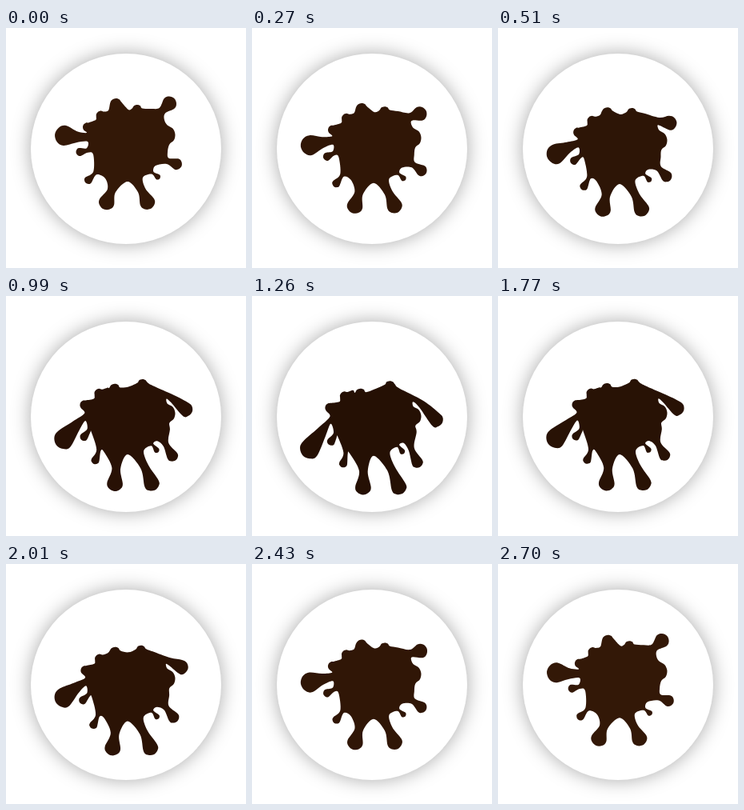
These frames come from a looping animation (300 by 300 pixels, 2730 ms). An HTML page:

```html
<!DOCTYPE html>
<html lang="en">
<head>
<meta charset="utf-8">
<title>Splash</title>
<style>
  html, body { margin: 0; width: 100%; height: 100%; overflow: hidden; background: #fff; }
  .disc {
    position: absolute; left: 31px; top: 32px; width: 238px; height: 238px;
    border-radius: 50%; background: #fff; box-shadow: 0 0 24px rgba(0, 0, 0, .34);
  }
  svg { position: absolute; left: 0; top: 0; }
</style>
</head>
<body>
<div class="disc"></div>
<svg width="300" height="300" viewBox="0 0 300 300"><path id="blob"/></svg>
<script>
const LOOP = 2730, STEP = 30;
const CENTER = [152, 150];
const BRIGHT = [51, 24, 7], DARK = [36, 15, 4];

// Each part: the valley before it, its round end, the radius, and how far the end sags.
const bump = (valley, end, r, fall) => ({ valley, end, r, fall, spread: 70 });
const drip = (valley, end, r, fall) => ({ valley, end, r, fall, spread: 90, neck: .55 });

// Clockwise from the top.
const parts = [
  bump([128, 103], [137.5, 95.5], 7.5, [-2, 30]),
  bump([153, 102], [164, 103], 7, [9, 11]),
  drip([182, 101], [204, 94.5], 9, [28, 65]),
  bump([198, 115], [198.5, 134], 13, [0, 18]),
  drip([202, 155], [213, 170], 7, [-7, 41]),
  drip([187, 172], [189.5, 186], 3.5, [-2, 9]),
  drip([171, 187], [176.5, 217.5], 9.5, [7.5, 23]),
  drip([152, 192], [126, 217.5], 9.8, [14, 23]),
  drip([124, 188], [103, 190], 5, [12, 21]),
  drip([109, 158], [92.5, 155], 5, [7, 29]),
  drip([102, 142], [73.5, 134.5], 12.5, [-1, 61]),
  bump([101, 131], [102, 124], 6, [-5, 17]),
  bump([112, 115], [119, 110], 6.5, [-3, 17]),
];

const mix = (a, b, k) => a.map((v, i) => v + (b[i] - v) * k);
const polar = ([x, y], r, a) => [x + r * Math.cos(a), y + r * Math.sin(a)];

// The body sinks most around its middle height and widens a little.
const sink = ([x, y], s) => [x + s * .08 * (x - CENTER[0]), y + s * (22 - .22 * Math.abs(y - 130))];

function partPoints(part, next, s) {
  const { r, spread, neck } = part;
  const from = sink(part.valley, s), to = sink(next.valley, s);
  const end = part.end.map((v, i) => v + s * part.fall[i]);
  const root = mix(mix(from, to, .5), CENTER, .2);
  const [dx, dy] = neck ? [end[0] - root[0], end[1] - root[1]] : [to[1] - from[1], from[0] - to[0]];
  const dir = Math.atan2(dy, dx);
  const pts = [-1, -.5, 0, .5, 1].map(k => polar(end, r, dir + k * spread * Math.PI / 180));
  if (neck) {
    const mid = mix(root, end, .6);
    mid[1] -= s * .25 * Math.hypot(dx, dy) * Math.cos(dir) ** 2; // hanging arms arch upwards
    pts.unshift(polar(mid, neck * r, dir - Math.PI / 2));
    pts.push(polar(mid, neck * r, dir + Math.PI / 2));
  }
  return [from, ...pts];
}

// Closed smooth curve through all points.
function curve(pts) {
  const n = pts.length, at = i => pts[(i + n) % n];
  const handle = (p, a, b) => p.map((v, k) => (v + (b[k] - a[k]) / 6).toFixed(2));
  let d = 'M' + pts[0];
  for (let i = 0; i < n; i++) {
    const p = at(i), q = at(i + 1);
    d += `C${handle(p, at(i - 1), q)} ${handle(q, at(i + 2), p)} ${q}`;
  }
  return d + 'Z';
}

const blob = document.getElementById('blob');

function draw(ms) {
  const t = Math.floor((ms % LOOP) / STEP) * STEP;
  const s = 1 - Math.abs(1 - 2 * t / LOOP);
  const pts = parts.flatMap((p, i) => partPoints(p, parts[(i + 1) % parts.length], s));
  blob.setAttribute('d', curve(pts));
  blob.setAttribute('fill', `rgb(${mix(BRIGHT, DARK, s).map(Math.round)})`);
}

const start = performance.now();
function tick() {
  draw(performance.now() - start);
  requestAnimationFrame(tick);
}
tick();
</script>
</body>
</html>
```
